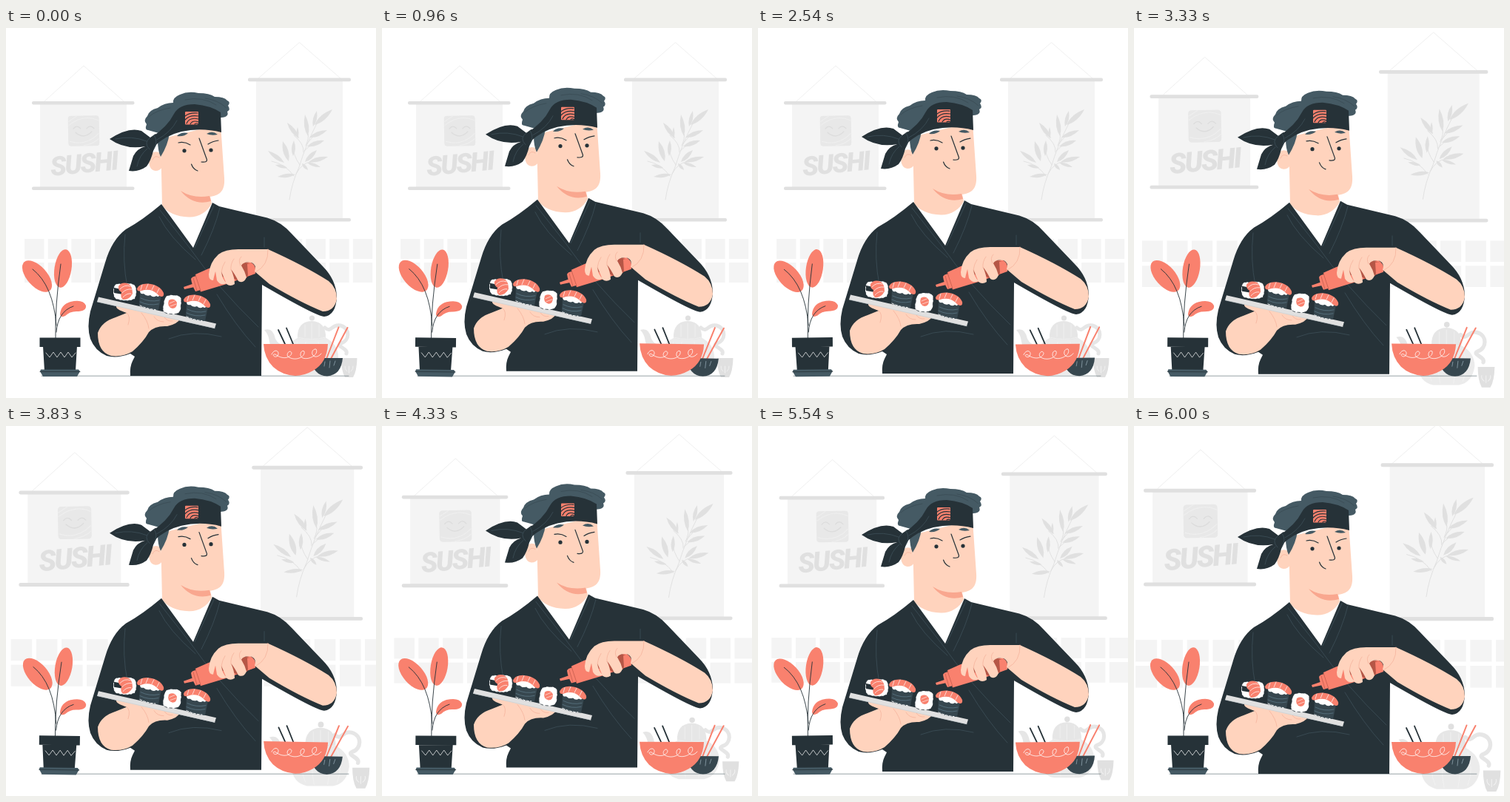
Recreate the animation shown at these times as an HTML page. Size 500x500 px, loop 6040 ms.

```html
<!DOCTYPE html>
<html lang="en">
<head>
<meta charset="utf-8">
<title>Sushi chef</title>
<style>
  html, body { margin: 0; width: 100%; height: 100%; overflow: hidden; background: #fff; }
  svg { display: block; width: 100%; height: 100%; }
  .line { fill: none; stroke-linecap: round; stroke-linejoin: round; }
  .dark { fill: #263238; }
  .slate { fill: #455a64; }
  .red { fill: #f9816e; }
  .skin { fill: #ffd3bd; }
  .shade { fill: #f9a78f; }
  .paper { fill: #f4f4f4; }
  .grey { fill: #e0e0e0; }
  .china { fill: #e6e6e6; }
  .ink { stroke: #263238; }
  .seam { stroke: #455a64; stroke-width: .6; }
  .crease { stroke: #f5b49d; stroke-width: .8; }
  .lettering { font: italic 800 36px Roboto, "Liberation Sans", sans-serif; letter-spacing: -2.3px; fill: #e0e0e0; }
</style>
</head>
<body>
<svg viewBox="0 0 500 500">
  <g id="room">
    <g id="tiles" class="paper"></g>

    <path class="line" stroke="#ececec" stroke-width=".8" d="M52 99L105 51L159 99M341 68L396.500 19.500L452 68"/>
    <path class="paper" d="M46 102H163V216H46ZM338 71H455V259H338Z"/>
    <g class="grey">
      <rect x="35" y="99" width="138.500" height="4.600" rx="2"/>
      <rect x="35" y="214.500" width="138.500" height="4.600" rx="2"/>
      <rect x="327" y="67.600" width="139" height="4.600" rx="2"/>
      <rect x="327" y="257" width="139" height="4.600" rx="2"/>
    </g>
    <g transform="rotate(-1 105 139)">
      <rect x="84" y="118.500" width="42" height="41" rx="4" fill="#e8e8e8"/>
      <path class="line" stroke="#efefef" d="M85 131Q105 116 125 125M86 153Q108 160 125 143M96 119Q88 124 85 126M104 159Q118 157 125 150"/>
      <path class="line" stroke="#dcdcdc" stroke-width="1.200" d="M91 136Q96 130 101 136M109 136Q114 130 119 136M94 141Q105 151 116 140"/>
    </g>
    <text class="lettering" transform="translate(61 200) rotate(-5.500)">SUSHI</text>

    <path class="line" stroke="#e0e0e0" stroke-width=".9" d="M383 232Q386 210 396 188Q405 158 421 127M389 200Q378 184 359 180M397 185Q388 172 388 160M402 168Q403 156 389 145M405 159Q410 148 408 143M392 197Q400 182 412 181M406 157L414 148M403 166L411 159"/>
    <g id="branch" class="grey"></g>

    <path class="line" stroke="#e6e6e6" stroke-width="5" d="M431 405C440 413 440 399 452 402C466 406 464 423 453 426C444 430 463 433 460 440"/>
    <path class="china" d="M349 408Q361 404 364 420Q369 430 380 428L382 444Q359 443 356 424Q355 414 349 408Z"/>
    <path fill="#ebebeb" d="M396 418H431Q449 427 449 445Q446 466 429 469H396Q378 465 376 444Q378 426 396 418Z"/>
    <path class="china" d="M394 419Q393 397 413 396Q433 397 432 419Q413 424 394 419Z"/>
    <circle class="grey" cx="413.500" cy="392" r="3.600"/>
    <path class="line" stroke="#f3f3f3" stroke-width=".7" d="M394 418Q413 423 432 418M404 401V417M413 399V419M423 401V417M394 424Q385 444 394 464M405 424Q400 444 405 467M422 424Q427 444 422 467M434 424Q442 444 434 464"/>
    <path class="grey" d="M453 446H474.500Q474 464 469 472H458Q453 463 453 446Z"/>
    <path class="line" stroke="#f1f1f1" d="M463.500 466V457M461 464Q457 461 458 457M466 464Q470 461 469 457"/>
  </g>

  <path class="line" stroke="#7d898e" stroke-width=".8" d="M48 470.200H463"/>

  <g id="chef">
    <!-- neck and shirt -->
    <path fill="#fff" d="M208 238L253 299L284 235Z"/>
    <path class="skin" d="M209 150L290 130L295 203C296 219 290 226 276 228L278 237C272 249 260 256 247 255.500C230 255 218 249 211 240Z"/>
    <path class="shade" d="M236 220Q253 231 275 227L277 234Q253 241 236 220Z"/>

    <!-- kimono -->
    <path class="dark" d="M210 238L253 297L279 236L288 241L353 256.500Q372 262 386 278L428 322Q446 340 447 363Q446 388 430 390Q420 390 346 347L345 470H168Q167 458 171 450L174 444L168 440Q150 447 136 443Q120 436 114 420Q109 404 114 383L134 317Q143 286 162 272Q184 260 210 238Z"/>
    <path class="line seam" d="M208 246L248 297Q285 350 341 404M207 255Q220 282 256 313M289 243Q282 272 264 307M281 240L255 297M161 279Q157 315 164 350M220 420Q252 407 291 417M349 283V296M285 360Q310 402 337 431"/>

    <!-- holding arm -->
    <path class="skin" d="M124 412Q129 397 148 391L163 385Q148 380 149 376Q151 373 167 377L236 392Q232 400 218 403Q201 402 193 411Q186 424 171 437Q158 445 142 443Q124 438 124 412Z"/>
    <path class="line crease" d="M163 385Q169 389 165 401M183 385Q192 396 193 406M200 390Q204 397 213 397M214 391Q218 397 225 396"/>

    <!-- tray -->
    <path class="grey" d="M125 363.500L284 399.500L282 406L123 370Z"/>
    <path class="line" stroke="#c9d0d3" stroke-width=".7" d="M123.500 370L282 405.700"/>

    <!-- salmon roll -->
    <path fill="#fff" stroke="#263238" stroke-width=".8" stroke-dasharray="3 2" d="M146 349Q148 344 157 346Q171 343 175 349Q178 358 174 366Q164 371 148 366Q143 360 146 349Z"/>
    <path class="dark" d="M146 351L156 353L158 360L146 358Z"/>
    <path class="red" d="M152 349Q157 342 166 346Q171 349 171 359Q166 368 158 367Q154 364 156 357Q151 354 152 349Z"/>
    <path class="line" stroke="#fff" stroke-width=".7" d="M154 353Q160 346 168 349M157 358Q162 352 170 353M158 364Q163 358 169 359"/>

    <g class="nigiri">
      <path fill="#37474f" d="M181 357L210 362L206 381Q192 381 180 375Z"/>
      <path class="line" stroke="#607d8b" stroke-width=".7" d="M182 365Q194 371 207 368M181 370Q193 376 206 373"/>
      <path class="line" stroke="#fff" stroke-dasharray="3 2" d="M181 375Q192 380 202 380.500"/>
      <path fill="#fff" d="M181 355Q196 349 208 360Q207 365 203 362Q199 365 195 361Q190 363 186 359Q181 360 181 355Z"/>
      <path class="red" d="M177 352Q180 345 192 345.500Q208 347 213 358Q214 363 210 363Q206 362 204 359Q195 351 183 355Q177 357 177 352Z"/>
      <path class="line" stroke="#fff" stroke-width=".7" d="M184 347L182 354M192 346L189 353M200 348L197 354M207 352L204 358"/>
    </g>
    <use id="second" transform="translate(63 15)"/>

    <!-- maki -->
    <path fill="#fff" stroke="#263238" stroke-width=".8" stroke-dasharray="4 3" d="M214 367Q216 360 225 361Q237 360 237 368L236 381Q233 388 224 386.500Q211 386 212 379Z"/>
    <path class="red" d="M220 368Q227 364 231 371Q231 379 225 379Q217 377 220 368Z"/>
    <path class="line" stroke="#fff" stroke-width=".6" d="M221 372L228 369M222 376L230 373"/>

    <!-- sauce bottle -->
    <path class="red" d="M240 350L253 345.500L255 350L241 353Z"/>
    <path class="red" d="M250 339Q251 336 257 335L263 354L256 356Q251 347 250 339Z"/>
    <path class="red" d="M256 333L274 325L330 316Q338 320 337 332L298 346L263 356.500Z"/>
    <path class="line" stroke="#c75e4f" stroke-width=".8" d="M256 334L263 355M253 338L258 355"/>
    <path fill="#b55646" d="M319 316L332 319L326 337L312 341L300 334L286 339L283 328Z"/>
    <path class="red" d="M326 319Q336 316 337 326Q336 333 327 335Z"/>

    <!-- pouring arm -->
    <path class="skin" d="M354 299Q403 321 436 342Q447 351 447 366Q444 383 428 383Q398 371 356 346L336 329Q339 320 332 317Q321 315 318 321Q323 329 325 337Q321 346 314 342Q309 332 304 326Q309 337 309 346Q303 350 298 346L291 329Q292 339 298 345Q290 349 285 341L283 329Q281 336 280 341Q274 341 274 333Q275 317 287 306Q296 299 314 299Z"/>
    <path class="line crease" d="M296 316Q292 322 291 330M308 312Q303 319 304 327M318 309Q313 314 317 321M354 299Q355 321 337 330"/>

    <!-- head -->
    <path class="skin" d="M209 169Q196 163 193 178Q193 192 202 193Q208 193 211 188Z"/>
    <path class="line crease" d="M207 175Q201 171 198 178"/>
    <path class="slate" d="M205 151L221 142Q219 158 209 174Q205 166 205 151Z"/>
    <path class="slate" d="M192 138Q187 138 190 130Q185 125 191 119Q193 111 205 108Q214 101 226 101Q225 94 235 90Q246 85 260 88Q275 88 282 93Q295 93 299 98Q304 100 300 105Q304 110 299 113Q302 120 291 121L270 125L210 143Z"/>
    <path class="line" stroke="#37474f" stroke-width=".6" d="M193 120Q203 111 222 108M242 97Q266 92 284 104M269 95Q286 97 298 108"/>
    <path class="dark" d="M196 148Q218 134 227 116Q234 103 255 103Q277 105 290 114L291 141Q264 134 237 140Q216 145 200 160Z"/>
    <path class="dark" d="M140 150Q166 133 183 139L195 148L202 143L206 152L199 166Q196 179 190 187Q179 195 166 193Q169 183 172 173Q177 163 188 160Q161 165 140 150Z"/>
    <path class="line seam" d="M148 150Q170 145 190 153M191 163Q180 172 177 187M195 148Q185 155 194 164M200 145Q206 153 200 163M204 151Q223 141 231 125"/>
    <rect class="red" x="242" y="113" width="18" height="17.500" rx="1"/>
    <path class="line ink" stroke-width="1.200" d="M242 119Q248 114 259 115M242 124Q248 117 260 119M244 129Q248 120 260 123M249 130Q252 124 260 127M255 130Q257 128 260 130"/>

    <path class="slate" d="M231 146Q236 140 246 142Q241 147 231 146ZM271 143Q279 138 286 144Q278 146 271 143Z"/>
    <path class="line ink" stroke-width="1.200" d="M233 155Q241 153 249 158M273 157Q279 153 287 152M261 149L271.500 178Q272 182 264 181M250.500 184Q253 191 259 193"/>
    <circle class="dark" cx="241" cy="165.800" r="2.600"/>
    <circle class="dark" cx="277" cy="165" r="2.600"/>
  </g>

  <g id="plant">
    <ellipse class="red" rx="13.500" ry="26" transform="translate(42 335.500) rotate(-42)"/>
    <ellipse class="red" rx="11.500" ry="26" transform="translate(77 325) rotate(9)"/>
    <path class="red" d="M73 387Q74 374 87 370Q104 366 108 375Q109 383 95 383Q86 383 80 389Q74 392 73 387Z"/>
    <path class="line ink" stroke-width=".9" d="M67 419Q66 375 74 319M68 402Q64 348 36 326M68 411Q70 383 91 376"/>
    <path class="dark" d="M45.500 418.500H100.500V431H45.500ZM50 430H96L94 463H52Z"/>
    <path class="slate" d="M47 461.500H98L100 464L96 471H50L46 464Z"/>
    <path class="line" stroke="#263238" stroke-width=".8" d="M46 464.500H100"/>
    <path class="line" stroke="#fff" stroke-width=".7" d="M54 439L59 445L64 438L69 445L74 438L79 445L84 438L89 445L94 439"/>
  </g>

  <g id="bowls">
    <path class="line" stroke="#f9816e" stroke-width="2" d="M449.500 404.500L433 447M461.500 405L439 447"/>
    <path fill="#37474f" d="M412 446H455Q453 469 434 470.500Q415 470 412 446Z"/>
    <path class="line" stroke="#90a4ae" stroke-width=".8" d="M431 451L430 457M438 450L437 459M445 450L443 456"/>
    <path class="line ink" stroke-width="1.800" d="M368 408L377 427M379 405.500L388 427"/>
    <path class="red" d="M348 427H435Q434 452 415 463Q403 470 391 470Q373 469 361 458Q349 446 348 427Z"/>
    <path class="line" stroke="#fff" stroke-width=".8" d="M359 441C363 432 371 437 367 443C363 447 358 440 364 441C376 450 386 444 386 439C384 434 378 440 381 444C390 451 405 445 403 437C399 434 395 443 401 446C410 449 423 441 419 434C414 433 411 441 417 444Q422 445 426 440"/>
  </g>
</svg>

<script>
  const LOOP = 6040, CYCLE = 3000;
  const el = id => document.getElementById(id);

  // Linear interpolation through [time, value] keys.
  function track(keys, t) {
    const i = keys.findIndex(key => key[0] > t);
    if (i < 0) return keys[keys.length - 1][1];
    if (i === 0) return keys[0][1];
    const [t0, v0] = keys[i - 1], [t1, v1] = keys[i];
    return v0 + (v1 - v0) * (t - t0) / (t1 - t0);
  }

  // Pointed leaf from base to tip, bulging w on both sides.
  function leaf([x0, y0, x1, y1, w]) {
    const dx = x1 - x0, dy = y1 - y0, len = Math.hypot(dx, dy);
    const mx = x0 + dx * .45, my = y0 + dy * .45;
    const nx = -dy / len * w, ny = dx / len * w;
    return `<path d="M${x0} ${y0}Q${mx + nx} ${my + ny} ${x1} ${y1}Q${mx - nx} ${my - ny} ${x0} ${y0}Z"/>`;
  }

  let tiles = '';
  for (let col = 0; col < 15; col++)
    for (const y of [285, 317])
      tiles += `<rect x="${25 + col * 31.7}" y="${y}" width="26.500" height="27"/>`;
  el('tiles').innerHTML = tiles;

  el('branch').innerHTML = [
    [417, 131, 441, 110, 7], [415, 133, 420, 112, 5], [408, 146, 404, 117, 6],
    [396, 149, 380, 128, 6], [394, 149, 394, 134, 3], [410, 148, 434, 138, 6],
    [407, 160, 430, 152, 6], [382, 180, 374, 153, 7], [388, 173, 389, 152, 5],
    [376, 182, 354, 166, 6], [380, 189, 364, 185, 4], [404, 181, 420, 165, 6],
    [409, 181, 435, 174, 6], [407, 182, 425, 188, 4], [400, 183, 408, 192, 4],
    [391, 198, 367, 201, 5]
  ].map(leaf).join('');

  const second = el('second');
  const copy = document.querySelector('.nigiri').cloneNode(true);
  copy.setAttribute('transform', second.getAttribute('transform'));
  second.replaceWith(copy);

  const float = [[0, 0], [1500, -9.7], [3000, 0]];
  const sway = [[0, 0], [750, 1], [2250, -1], [3000, 0]];
  const pulse = [[2970, 1], [3570, 1.1], [4770, 1], [5370, 1], [5970, 1.1], [7170, 1]];

  function render(t) {
    const phase = t % CYCLE, angle = track(sway, phase);
    el('chef').setAttribute('transform', `translate(0 ${track(float, phase)})`);
    el('plant').setAttribute('transform', `rotate(${angle} 64.500 385)`);
    el('bowls').setAttribute('transform', `rotate(${angle} 405 437)`);
    el('room').setAttribute('transform',
      `translate(260 245.500) scale(${track(pulse, t)}) translate(-260 -245.500)`);
  }

  function tick() {
    render(performance.now() % LOOP);
    requestAnimationFrame(tick);
  }
  tick();
</script>
</body>
</html>
```
